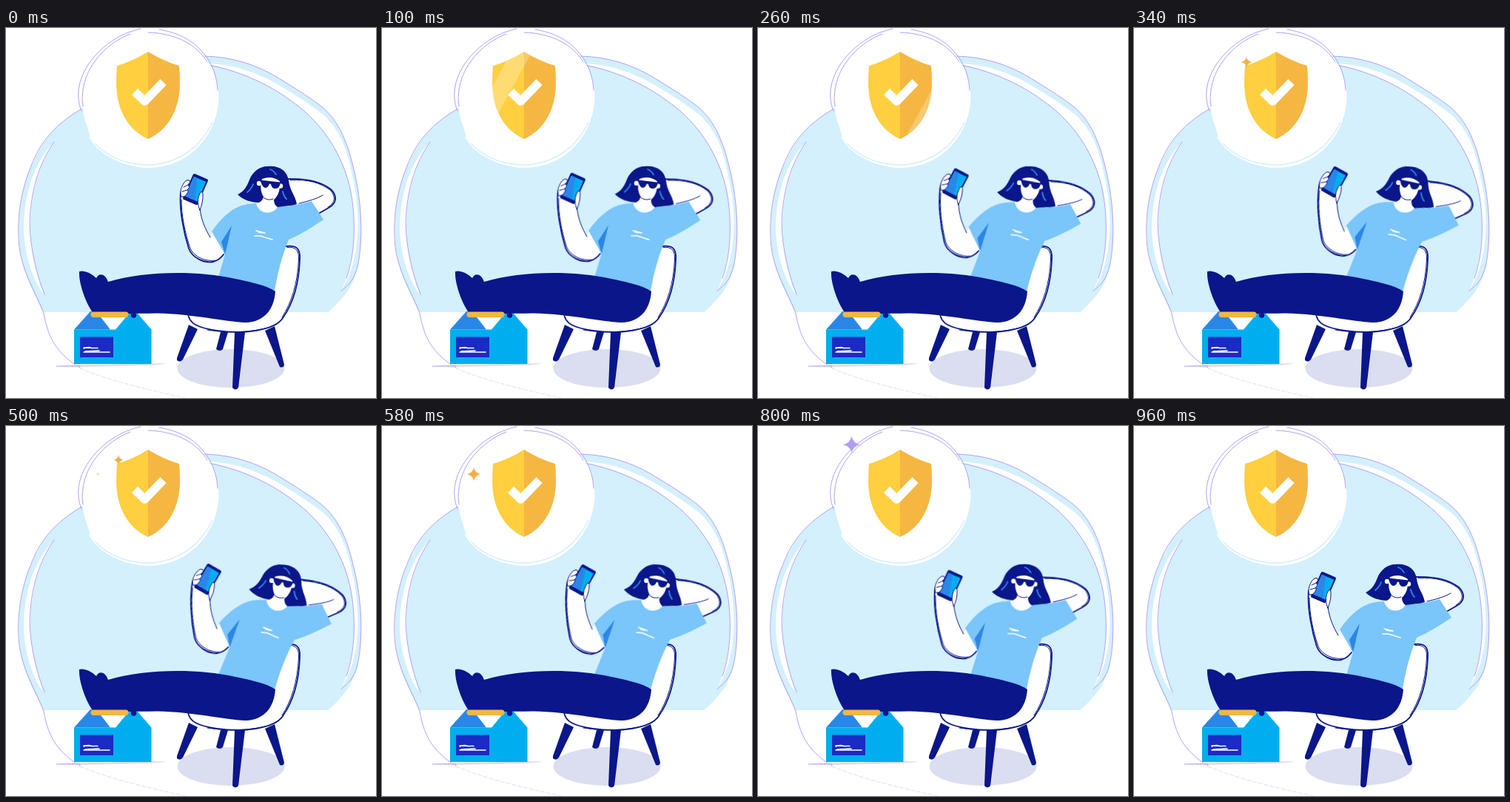
Recreate the animation shown at these times as an HTML page. Size 500x500 px, loop 1000 ms.

```html
<!DOCTYPE html>
<html lang="en">
<head>
<meta charset="utf-8">
<title>Relaxed and protected</title>
<style>
  html, body { margin: 0; width: 100%; height: 100%; overflow: hidden; background: #fff; }
  svg { display: block; width: 100vw; height: 100vh; }

  .navy { fill: #0a168a; }
  .blue { fill: #2a87e8; }
  .cyan { fill: #00aef0; }
  .sky { fill: #d3f0fc; }
  .white { fill: #fff; }
  .amber { fill: #f5b642; }
  .shirt { fill: #7ac5fa; }
  .line { fill: none; stroke: #0a168a; stroke-width: 1.8; stroke-linecap: round; stroke-linejoin: round; }
  .thin { stroke-width: 1; }
  .sketch { fill: none; stroke: #a996fa; stroke-width: .9; stroke-linecap: round; }
  .chalk { fill: none; stroke: #fff; stroke-width: 1.5; stroke-linecap: round; }
  .glint { fill: none; stroke: #2a87e8; stroke-width: 1.8; stroke-linecap: round; }

  .torso { transform-origin: 360px 358px; animation: lean 1s infinite; }
  @keyframes lean {
    0% { transform: rotate(0deg); animation-timing-function: ease-in-out; }
    44%, 47% { transform: rotate(6.6deg); animation-timing-function: ease-in-out; }
    95%, 100% { transform: rotate(0deg); }
  }

  .shine { fill: #fff; opacity: .26; animation: sweep 1s linear infinite; }
  @keyframes sweep {
    0%, 2% { transform: translateX(-88px); }
    28%, 100% { transform: translateX(55px); }
  }

  .star { transform: scale(0); animation: 1s linear infinite; }
  .s1 { animation-name: twinkle1; }
  .s2 { animation-name: twinkle2; }
  .s3 { animation-name: twinkle3; }
  @keyframes twinkle1 {
    0%, 30% { transform: scale(0); }
    42% { transform: scale(2.1); }
    54%, 100% { transform: scale(0); }
  }
  @keyframes twinkle2 {
    0%, 48.5% { transform: scale(0); }
    60% { transform: scale(1.1); }
    72.500%, 100% { transform: scale(0); }
  }
  @keyframes twinkle3 {
    0%, 68% { transform: scale(0); }
    80% { transform: scale(1.15); }
    92%, 100% { transform: scale(0); }
  }
</style>
</head>
<body>
<svg viewBox="0 0 500 500">
  <defs>
    <path id="shield" d="M192 32Q213 45 234 51Q235 62 235 74C235 110 219 138 192 150C165 138 149 110 149 74Q149 62 150 51Q171 45 192 32Z"/>
    <clipPath id="inShield"><use href="#shield"/></clipPath>
    <path id="spark" d="M0-10Q1.6-1.6 10 0Q1.6 1.6 0 10Q-1.6 1.6-10 0Q-1.6-1.6 0-10Z"/>
  </defs>

  <!-- backdrop -->
  <path class="sky" d="M50 384C42 366 24 336 19 300C14 250 22 205 45 165C62 135 84 120 105 107L262 38C300 38 332 47 362 64C382 76 402 88 425 105C450 125 461 154 469 187C479 226 483 272 477 312C473 344 460 362 435 384Z"/>
  <path class="white" d="M66 153C38 180 24 225 24 272C25 310 38 345 52 361C42 335 33 300 33 265C34 220 46 182 66 153Z"/>
  <path class="white" d="M268 48C305 48 340 60 372 79C392 91 412 104 430 118C452 140 462 165 469 205C478 245 482 310 453 355C473 312 473 262 466 222C458 180 436 142 405 114C368 82 325 60 268 48Z"/>
  <g class="sketch">
    <path d="M104 108C84 120 62 135 45 163C23 203 13 250 18 296C23 334 44 364 51 386C56 412 64 438 100 459"/>
    <path d="M65 154C45 182 33 220 32 265C33 300 42 335 52 360"/>
    <path d="M262 38C300 38 332 47 362 64C382 76 402 88 425 105C450 125 461 154 469 187C479 226 483 272 477 312C473 338 464 347 453 355"/>
    <path d="M274 50C325 60 368 82 405 114C436 142 458 180 466 222C473 258 472 306 460 338"/>
    <path stroke="#dcd8f4" stroke-dasharray="5 3" d="M100 460C140 477 190 488 242 500"/>
  </g>

  <!-- badge -->
  <path class="white" d="M193 5C250 5 288 45 287.500 95C286 140 252 187 195 189C160 189 128 172 114 148L103 112C98 50 140 5 193 5Z"/>
  <path fill="none" stroke="#d3f0fc" stroke-width="1.6" d="M120 156C140 177 166 185 194 185C234 183 264 160 279 127"/>
  <path class="sky" d="M104 108C105 132 110 148 124 162L108 160L98 113Z"/>
  <path class="chalk" stroke-width="3" d="M113 148C126 171 158 187 192 188"/>
  <g class="sketch">
    <path d="M182 1C144 9 112 38 101 70C96 86 97 100 102 112"/>
    <path d="M168 8C134 21 108 52 104 84Q102 96 104 106"/>
    <path d="M207 2C232 6 252 16 266 33C278 47 285 64 286 84"/>
    <path d="M192 6C228 7 257 21 272 46"/>
  </g>
  <g clip-path="url(#inShield)">
    <path fill="#ffcf40" d="M140 25h52v130h-52z"/>
    <path class="amber" d="M192 25h52v130h-52z"/>
    <path class="shine" d="M225 20h28L176 160h-28z"/>
  </g>
  <path fill="none" stroke="#fff" stroke-width="11.500" stroke-linejoin="round" d="M174 86L187.500 99L212.500 73"/>

  <!-- sparkles -->
  <g transform="translate(152 46)"><use href="#spark" class="star s1" fill="#f5ae45"/></g>
  <g transform="translate(124 65)"><use href="#spark" class="star s2" fill="#f5ae45"/></g>
  <g transform="translate(126.500 25)"><use href="#spark" class="star s3" fill="#b09cf8"/></g>

  <!-- chair -->
  <ellipse cx="304" cy="460" rx="72.500" ry="26" fill="#dbdef0"/>
  <g class="navy">
    <path d="M247 401L259 407L239 448Q235 453 231 449V446Z"/>
    <path d="M290 411H300L293 434Q289 438 284 434Z"/>
    <path d="M309 411H323L314 486Q310 491 306 486Z"/>
    <path d="M350 409L363 403L376 455Q375 460 370 458Z"/>
  </g>
  <path class="white" d="M368 297C384 292 398 293 397 312C396 345 388 372 374 392C363 409 320 414 285 409C260 405 247 400 246 386L330 360Z"/>
  <path class="line" d="M378 295C391 293 398 297 397 312C396 345 388 372 374 392C363 409 320 414 285 409C260 405 247 400 246 386"/>
  <path class="line thin" d="M380 296.500C392 295 396 301 395.500 313C394 345 386 371 373 391M272 408C310 414 352 410 369 398"/>

  <!-- upper body -->
  <g class="torso">
    <path class="white" d="M378 203C405 203 426 208 439 218C449 227 447 237 436 243L421 253L390 241Z"/>
    <path class="line" d="M380 204C405 203 426 208 439 218C448 227 447 237 436 243L422 251"/>
    <path class="line thin" d="M384 205.500C408 204.500 425 209 438 219C446 228 445 236 435 242M396 237C408 234 420 231 428 226"/>

    <path class="white" d="M237 220C234 245 240 276 247 298C252 311 268 319 282 316C288 314 292 309 296 304L279 275L276 283C268 268 264 258 262 247L266 222L250 206Z"/>
    <path class="line" d="M236 222C234 245 240 276 247 298C252 311 268 318 280 316C287 314 291 310 294 306"/>
    <path class="line thin" d="M237 232C237 254 242 277 249 298C255 310 270 316 283 314M262 244C264 260 269 271 276 283"/>

    <path class="shirt" d="M278 275C290 258 302 246 318 240Q328 237 338 237C342 253 360 253 367 242Q392 240 413 234L429 259C411 271 396 280 382 286C372 310 366 335 362 362L282 354L296 306Z"/>
    <path class="blue" d="M305 267L291 289L296 306Z"/>
    <path class="chalk" d="M338 274L350 277M341 276L347 277M336 281L344 281L360 286"/>

    <!-- phone and hand -->
    <g transform="translate(256 218) rotate(23.500)">
      <rect class="navy" x="-11" y="-19" width="22" height="38" rx="2.500"/>
      <path class="cyan" d="M-9-15H9V14H-9Z"/>
      <path class="blue" d="M-9-15H-3L5 14H-9Z"/>
    </g>
    <g class="line thin">
      <path class="white" d="M237 228C234 220 238 214 240 210Q244 204 248 206Q250 208 246 212L247 213Q249 215 245 219L246 219Q247 222 242 227Z"/>
      <path d="M246 212L240 215M245 219L238 221"/>
      <path class="white" d="M260 240C258 232 261 224 264 221Q267 223 266 228Q266 236 262 246Z"/>
    </g>

    <!-- head -->
    <path class="navy" d="M353 187C369 185 380 193 382 206C383 219 391 226 393 238C384 241 374 240 364 243L343 236C331 236 320 232 313 225C322 221 326 213 329 205C333 195 342 187 353 187Z"/>
    <path class="white" d="M346 204Q359 199 370 207C371 218 368 227 362 232Q362 239 367 242C360 253 342 251 338 237Q346 236 348 228C344 222 343 212 346 204Z"/>
    <circle class="white" cx="342" cy="210" r="3.200"/>
    <circle class="white" cx="371" cy="213.500" r="3.200"/>
    <path class="navy" d="M344 205.500L371 208.500Q370 217 364 217Q359 217 358 211L356 210.500Q354 216 350 216Q345 214 344 205.500Z"/>
    <path class="line thin" d="M348 229Q354 234 361 231"/>
    <path class="glint" d="M357 191Q362 193 365 198M326 222Q332 217 334 211M374 221Q375 227 379 231"/>
  </g>

  <!-- box -->
  <path fill="#dcdcf0" d="M68 456L216 453Q213 455 190 456L100 458Z"/>
  <path class="sketch" d="M68 457H100"/>
  <path class="white" d="M120 386L141 408H148L166 386Z"/>
  <path class="cyan" d="M92 407.500H148L166 386L178 386L196.500 407.500V454H92Z"/>
  <path class="blue" d="M92 407.500L114 383H122L141 407.500Z"/>
  <path fill="#1b2bc4" d="M100 417.500H145V445H100Z"/>
  <path class="chalk" d="M105 432L124 432.500M105 433Q112 430 117 433M105 438L140 438M107 437L126 436"/>

  <!-- legs -->
  <path class="navy" d="M99 329C105 327 115 331 122 338C125 331 134 331 138 343C185 329 255 327 310 339C340 345 356 350 364 356C362 381 349 397 324 398C296 397 250 386 205 385.500C165 386 135 387 117 384C108 372 98 345 99 329Z"/>
  <rect class="amber" x="114.500" y="383.500" width="51" height="7.500" rx="3.700"/>
  <circle class="navy" cx="172.500" cy="388" r="3.800"/>
</svg>
</body>
</html>
```
